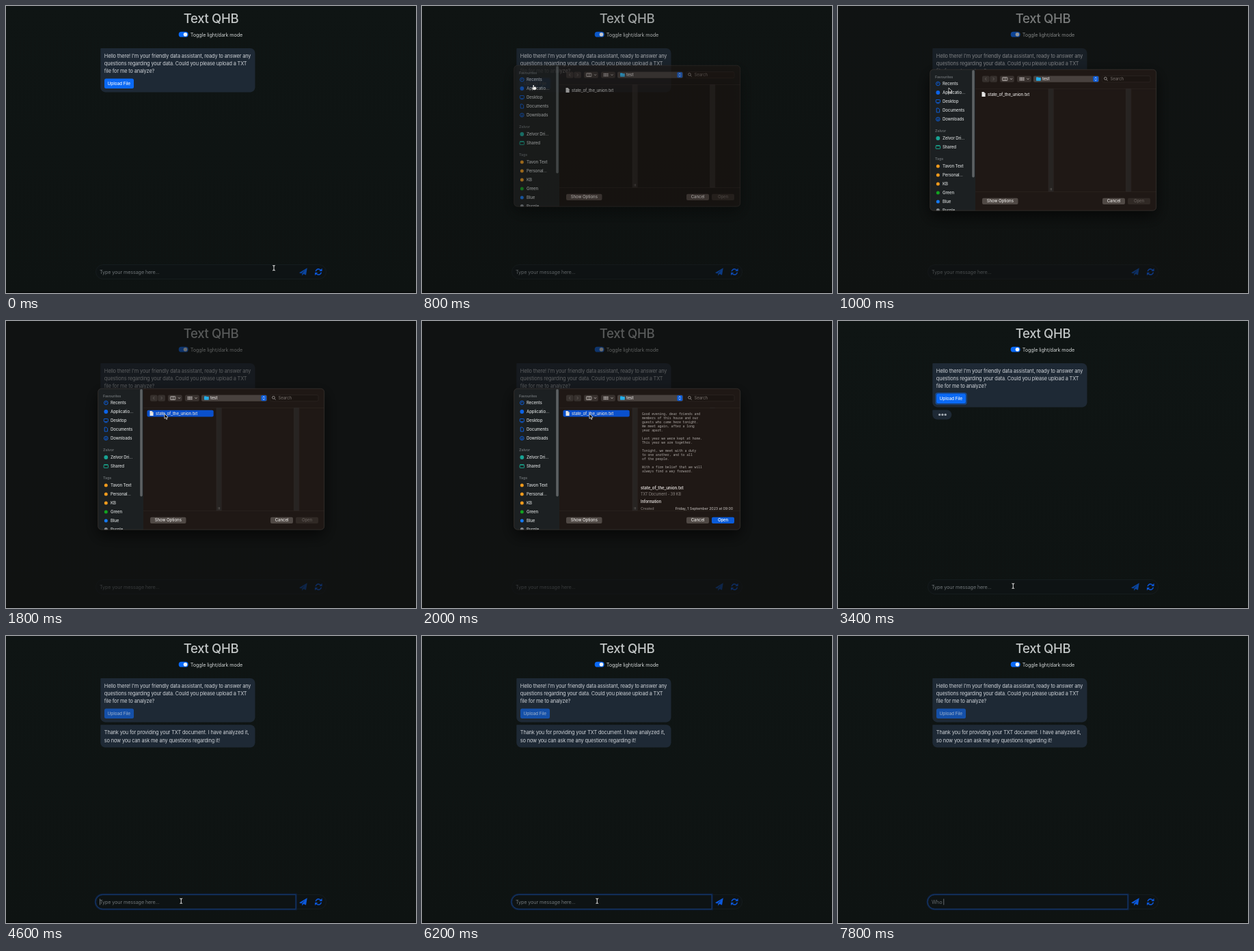
Recreate the animation shown at these times as an HTML page with a canvas. Size 600x421 px, loop 8 s.

```html
<!DOCTYPE html>
<html lang="en">
<head>
<meta charset="utf-8">
<title>Document chat</title>
<style>
  html, body { margin: 0; width: 100%; height: 100%; overflow: hidden; background: #0e1413; }
  canvas { display: block; width: 600px; height: 421px; }
</style>
</head>
<body>
<canvas id="stage"></canvas>
<script>
const W = 600, H = 421, LOOP = 8000, TICK = 200;
const canvas = document.getElementById('stage');
const ctx = canvas.getContext('2d');
const scale = window.devicePixelRatio || 1;
canvas.width = W * scale;
canvas.height = H * scale;

// Linear interpolation through [time, ...values] stops.
function track(stops, t) {
  const next = stops.findIndex(s => s[0] > t);
  if (next < 0) return stops[stops.length - 1].slice(1);
  if (next === 0) return stops[0].slice(1);
  const a = stops[next - 1], b = stops[next], k = (t - a[0]) / (b[0] - a[0]);
  return a.slice(1).map((v, i) => v + (b[i + 1] - v) * k);
}

function setFont(size, weight = 400, family = 'Inter, sans-serif') {
  ctx.font = `${weight} ${size}px ${family}`;
  ctx.letterSpacing = `${-0.02 * size}px`;
}

// y is the vertical middle of the capitals.
function text(str, x, y, size, color, weight = 400, align = 'left') {
  setFont(size, weight);
  ctx.textAlign = align;
  ctx.fillStyle = color;
  ctx.fillText(str, x, y + size * 0.36);
}

function box(x, y, w, h, r, fill, stroke, line = 1) {
  ctx.beginPath();
  ctx.roundRect(x, y, w, h, r);
  if (fill) { ctx.fillStyle = fill; ctx.fill(); }
  if (stroke) { ctx.strokeStyle = stroke; ctx.lineWidth = line; ctx.stroke(); }
}

function dot(x, y, r, color) {
  ctx.beginPath();
  ctx.arc(x, y, r, 0, Math.PI * 2);
  ctx.fillStyle = color;
  ctx.fill();
}

function path(points, fill, stroke, line = 1) {
  ctx.beginPath();
  for (let i = 0; i < points.length; i += 2) ctx.lineTo(points[i], points[i + 1]);
  if (fill) { ctx.closePath(); ctx.fillStyle = fill; ctx.fill(); }
  if (stroke) { ctx.strokeStyle = stroke; ctx.lineWidth = line; ctx.stroke(); }
}

function at(x, y, draw) {
  ctx.save();
  ctx.translate(x, y);
  draw();
  ctx.restore();
}

function bubble(y, w, h, lines = []) {
  box(138.3, y, w, h, [1, 7, 7, 7], '#1e2935');
  lines.forEach((line, i) => text(line, 143.8, y + 11.3 + i * 11.25, 7.38, '#d0d4d9'));
}

function uploadButton(t) {
  const disabled = t >= 4200, returning = t === 2200;
  const hover = t >= 600 && t < 2200;
  const fill = disabled ? '#1550a8' : returning ? '#0b479e' : hover ? '#0a58ca' : '#0a69f5';
  if (t >= 800 && !disabled) box(143, 105.7, 45, 16.4, 3, null, returning ? '#2b62b4' : '#174b93', 1.4);
  box(144, 106.5, 43, 14.4, 2.5, fill);
  text('Upload File', 165.3, 113.8, 6.5, disabled ? '#8da5c6' : '#e9f0fb', 500, 'center');
}

function sendIcon(color) {
  at(435, 390, () => {
    path([-6, 1.3, 5.8, -5.8, 4, 4.7, 0.4, 3.1, -1.7, 5.8, -1.7, 2.2, 3.3, -3, -3, 2.5], color);
  });
}

function refreshIcon(color) {
  at(457.3, 390, () => {
    for (let i = 0; i < 2; i++) {
      ctx.beginPath();
      ctx.arc(0, 0, 4.1, Math.PI * 1.05, Math.PI * 1.8);
      ctx.strokeStyle = color;
      ctx.lineWidth = 1.6;
      ctx.stroke();
      path([5.3, -5.2, 5.3, -0.9, 1, -0.9], color);
      ctx.rotate(Math.PI);
    }
  });
}

function inputBar(t) {
  const typed = t >= 7800 ? 'Who ' : t >= 7400 ? 'Who' : t >= 6800 ? 'W' : '';
  const focused = t >= 3600;
  box(131.5, 379.5, 337, 21, 10.5, '#0e1314', '#171e20', 0.9);
  if (focused) {
    box(130.7, 379, 293.8, 22, [11, 0, 0, 11], null, '#0e2140', 2.4);
    box(131.1, 379.4, 293, 21.2, [10.5, 0, 0, 10.5], null, '#173c70', 0.9);
  }
  text(typed || 'Type your message here...', 137, 390, 7.28, typed ? '#62686c' : '#6f7578');
  const blinkOn = (t >= 3600 && t < 4000) || (t >= 4400 && t < 5000) ||
    (t >= 5600 && t < 6000) || t >= 6600;
  if (focused && blinkOn) {
    setFont(7.28);
    ctx.fillStyle = '#8c9296';
    ctx.fillRect(137.2 + ctx.measureText(typed).width, 385.5, 0.7, 9);
  }
  sendIcon(t >= 4200 ? '#0c59dc' : '#0b459f');
  refreshIcon('#0c55d4');
}

function page(t) {
  const sky = ctx.createLinearGradient(0, 0, 0, H);
  sky.addColorStop(0, '#0f1514');
  sky.addColorStop(1, '#0e1312');
  ctx.fillStyle = sky;
  ctx.fillRect(0, 0, W, H);
  ctx.fillStyle = '#060909';
  ctx.fillRect(0, 419.5, W, 1.5);

  text('Text QHB', 300, 18, 18.6, '#c2c6c6', 500, 'center');
  box(252.7, 37.8, 14, 7.8, 3.9, '#0a69f5');
  dot(262.5, 41.7, 2.8, '#f1f5fb');
  text('Toggle light/dark mode', 269.8, 41.9, 7.28, '#cdd1d1');

  bubble(62, 226.2, 64.4, [
    "Hello there! I'm your friendly data assistant, ready to answer any",
    'questions regarding your data. Could you please upload a TXT',
    'file for me to analyze?'
  ]);
  uploadButton(t);
  if (t >= 4200) {
    bubble(130.3, 226.2, 33.2, [
      'Thank you for providing your TXT document. I have analyzed it,',
      'so now you can ask me any questions regarding it!'
    ]);
  } else if (t >= 2600) {
    bubble(130.5, 28, 14);
    for (let i = 0; i < 3; i++) dot(148.6 + i * 4.3, 137.4, 1.65, '#a2a9b1');
  }
  inputBar(t);
}

const BLUE = '#0c63e8';
function placeIcon(kind, y, color) {
  const x = 146.3;
  if (kind === 'dot') dot(x, y, 2.5, color);
  if (kind === 'disc') dot(x, y, 2.9, color);
  if (kind === 'screen') {
    box(x - 3, y - 2.5, 6, 4.2, 0.6, null, color, 0.9);
    path([x - 2, y + 2.8, x + 2, y + 2.8], null, color, 0.9);
  }
  if (kind === 'page') path([x - 2.1, y - 3, x + 0.7, y - 3, x + 2.3, y - 1.2, x + 2.3, y + 3, x - 2.1, y + 3, x - 2.1, y - 3], null, color, 0.9);
  if (kind === 'clock' || kind === 'down') {
    box(x - 2.8, y - 2.8, 5.6, 5.6, 2.8, null, color, 0.9);
    path(kind === 'clock' ? [x, y - 1.7, x, y, x - 1.3, y] : [x, y - 1.6, x, y + 1.4], null, color, 0.8);
    if (kind === 'down') path([x - 1.2, y + 0.3, x, y + 1.5, x + 1.2, y + 0.3], null, color, 0.7);
  }
  if (kind === 'folder') {
    box(x - 3.2, y - 1.8, 6.4, 4.2, 0.6, null, color, 0.9);
    path([x - 3, y - 2.4, x + 3, y - 2.4], null, color, 0.9);
  }
}

const PLACES = [
  [120, 'Recents', 'clock', BLUE], [133, 'Applicatio...', 'disc', BLUE],
  [146, 'Desktop', 'screen', BLUE], [159, 'Documents', 'page', BLUE],
  [172, 'Downloads', 'down', BLUE], [200, 'Zelvor Dri...', 'disc', '#18a394'],
  [213, 'Shared', 'folder', '#18b096'], [241, 'Tavon Text', 'dot', '#f09a1c'],
  [254, 'Personal...', 'dot', '#f09a1c'], [267, 'KB', 'dot', '#f09a1c'],
  [280, 'Green', 'dot', '#12a320'], [293, 'Blue', 'dot', '#1479f3'],
  [305.5, 'Purple', 'dot', '#8b8f94']
];

function sidebar() {
  ctx.fillStyle = '#1c2022';
  ctx.fillRect(134.5, 99, 66.5, 207.5);
  [[110, 'Favourites'], [189.5, 'Zelvor'], [230.5, 'Tags']].forEach(([y, name]) =>
    text(name, 142, y, 5.4, '#686d70', 600));
  PLACES.forEach(([y, name, kind, color]) => {
    placeIcon(kind, y, color);
    text(name, 153, y, 6.1, '#d3d6d7', 500);
  });
  box(196.2, 100, 3.6, 157.5, 1.8, '#5d6163');
}

function chevron(x, y, dx, dy, color = '#c9c4c1') {
  const points = dx ? [x - dx, y - 2, x + dx, y, x - dx, y + 2] : [x - 1.5, y - dy, x, y + dy, x + 1.5, y - dy];
  path(points, null, color, 0.8);
}

function toolbar() {
  box(211, 108.5, 10.6, 9.2, 2, '#36302d');
  box(222.3, 108.5, 10.6, 9.2, 2, '#36302d');
  chevron(216.3, 113, -0.9, 0, '#68625f');
  chevron(227.6, 113, 0.9, 0, '#68625f');
  box(237, 108.5, 20.8, 9.2, 2, '#39322f');
  box(240.5, 110.7, 7.4, 4.8, 0.6, null, '#c9c4c1', 0.8);
  path([243, 110.7, 243, 115.5], null, '#c9c4c1', 0.7);
  path([245.4, 110.7, 245.4, 115.5], null, '#c9c4c1', 0.7);
  chevron(253.5, 113, 0, 0.8);
  box(262, 108.5, 20.8, 9.2, 2, '#39322f');
  ctx.fillStyle = '#c9c4c1';
  for (let i = 0; i < 6; i++) ctx.fillRect(265.7 + i % 3 * 2.5, 110.8 + (i > 2) * 2.7, 1.8, 1.8);
  chevron(278, 113, 0, 0.8);
  box(286, 108.5, 96, 9.2, 2, '#48413e');
  box(290, 110.2, 3.5, 2, 0.5, '#1b9bd8');
  box(290, 111, 6.8, 4.8, 0.8, '#25aee8');
  text('test', 299, 113, 6.1, '#e2dfdd', 500);
  box(373.3, 109, 7.8, 8.2, 1.8, '#0b5bd8');
  chevron(377.2, 111.5, 0, -0.7, '#fff');
  chevron(377.2, 114.7, 0, 0.7, '#fff');
  box(386.5, 108.5, 70.5, 9.2, 2, '#1b1512', '#302925', 0.6);
  box(389.5, 110.4, 3.8, 3.8, 1.9, null, '#aaa5a2', 0.8);
  path([392.8, 113.8, 394.5, 115.6], null, '#aaa5a2', 0.8);
  text('Search', 398.5, 113.2, 6.1, '#77706c');
}

function preview() {
  setFont(4.9, 400, '"Noto Sans Mono", monospace');
  ctx.textAlign = 'left';
  ctx.fillStyle = '#aaa5a2';
  const lines = [
    'Good evening, dear friends and', 'members of this house and our', 'guests who came here tonight.',
    'We meet again, after a long', 'year apart.', '', 'Last year we were kept at home.',
    'This year we are together.', '', 'Tonight, we meet with a duty', 'to one another, and to all',
    'of the people.', '', 'With a firm belief that we will', 'always find a way forward.'
  ];
  lines.forEach((line, i) => ctx.fillText(line, 322, 138 + i * 6));
  text('state_of_the_union.txt', 320, 244.5, 6.1, '#ddd8d5', 600);
  text('TXT Document - 39 KB', 320, 254, 5.6, '#8d8783');
  text('Information', 320, 265, 5.6, '#ddd8d5', 600);
  text('Created', 320, 275, 5.4, '#8d8783');
  text('Friday, 1 September 2023 at 09:00', 455, 275, 5.4, '#c9c4c1', 400, 'right');
}

function pushButton(label, x, w, fill, color) {
  box(x, 287.7, w, 9.2, 2, fill);
  text(label, x + w / 2, 292.3, 6.1, color, 500, 'center');
}

function dialog(t) {
  const [shift, alpha] = track([
    [800, -12, 0.6], [1000, -6, 1], [1200, 0, 1], [2000, 0, 1], [2200, -15, 0.045], [2400, -20, 0]
  ], t);
  if (t < 800 || alpha <= 0) return;
  ctx.save();
  ctx.globalAlpha = alpha;
  ctx.translate(0, shift);
  ctx.shadowColor = 'rgba(0,0,0,.65)';
  ctx.shadowBlur = 22 * scale;
  ctx.shadowOffsetY = 8 * scale;
  box(134.5, 99, 331.5, 207.3, 5, '#1f1815');
  ctx.shadowColor = 'transparent';

  ctx.save();
  ctx.beginPath();
  ctx.roundRect(134.5, 99, 331.5, 207.3, 5);
  ctx.clip();
  sidebar();
  ctx.fillStyle = '#2d2622';
  ctx.fillRect(201, 127, 265, 0.6);
  ctx.fillRect(201, 278, 265, 0.6);
  [308, 421.5].forEach(x => {
    box(x, 127.5, 7.3, 150.5, 0, '#272422', '#302b28', 0.5);
  });
  path([311, 273, 311, 276.4], null, '#77716e', 0.5);
  path([312.5, 273, 312.5, 276.4], null, '#77716e', 0.5);
  toolbar();

  if (t >= 1800) box(206.5, 130.8, 97.2, 9.6, 2, '#0a50cc');
  path([210.5, 132, 213.5, 132, 215.6, 134.2, 215.6, 139, 210.5, 139], '#e7e7e7');
  path([213.5, 132, 213.5, 134.2, 215.6, 134.2], null, '#9b9b9b', 0.5);
  text('state_of_the_union.txt', 219, 135.4, 6.1, '#e0dddb', 500);
  const previewed = t >= 2000;
  if (previewed) {
    ctx.fillStyle = '#1f1815';
    ctx.fillRect(316, 128, 149, 149.5);
    preview();
  }
  pushButton('Show Options', 211, 52.5, '#504945', '#e2dfdd');
  pushButton('Cancel', 387, 33, '#504945', '#e2dfdd');
  pushButton('Open', 424, 33, previewed ? '#0b5bd8' : '#302925', previewed ? '#fff' : '#615a56');
  ctx.restore();
  box(134.7, 99.2, 331, 206.9, 5, null, '#3a3533', 0.7);
  ctx.restore();
}

const POINTER = [
  [0, 392, 384.3], [200, 345, 318], [400, 240, 190], [600, 170, 118], [800, 163, 116],
  [1000, 162, 120], [1200, 163, 121], [1400, 188, 128], [1600, 229, 135], [1800, 232, 136],
  [2000, 245, 136], [2200, 268, 133], [2600, 268, 145], [3200, 258, 370], [3400, 256.3, 388.7]
];

function beam() {
  for (const [color, line] of [['#050707', 2.2], ['#d7d9d9', 1.1]]) {
    path([0, -3.2, 0, 3.2], null, color, line);
    path([-1.9, -3.6, -0.7, -3.5, 0, -3, 0.7, -3.5, 1.9, -3.6], null, color, line);
    path([-1.9, 3.6, -0.7, 3.5, 0, 3, 0.7, 3.5, 1.9, 3.6], null, color, line);
  }
}

function arrow() {
  path([0, 0, 0, 7.2, 1.7, 5.7, 2.8, 8.3, 4, 7.8, 2.9, 5.3, 5.1, 5.2], '#000', '#e6e6e6', 0.8);
}

function hand() {
  box(-0.6, 0, 1.6, 5, 0.8, '#f0f0f0');
  box(-0.6, 2.5, 5, 4.8, [0.6, 1.5, 2, 2], '#f0f0f0', '#101010', 0.4);
  path([-2.3, 3.4, -0.6, 4.2, 0.8, 7.2, -0.2, 7], '#f0f0f0');
}

function pointer(t) {
  if (t >= 6800) return;
  const [x, y] = track(POINTER, t);
  const overButton = t === 600 || t === 800;
  const shape = t === 0 || t >= 3200 ? beam : overButton || t === 2200 ? hand : arrow;
  at(x, y, shape);
}

function render(now) {
  const t = Math.floor(now % LOOP / TICK) * TICK;
  ctx.setTransform(scale, 0, 0, scale, 0, 0);
  page(t);
  const [dim] = track([[600, 0], [800, 0.2], [1000, 0.42], [1400, 0.6], [2000, 0.6], [2200, 0]], t);
  if (dim > 0) {
    ctx.fillStyle = `rgba(18,18,18,${dim})`;
    ctx.fillRect(0, 0, W, H);
  }
  dialog(t);
  pointer(t);
}

const start = performance.now();
function loop() {
  render(performance.now() - start);
  requestAnimationFrame(loop);
}
loop();
</script>
</body>
</html>
```
